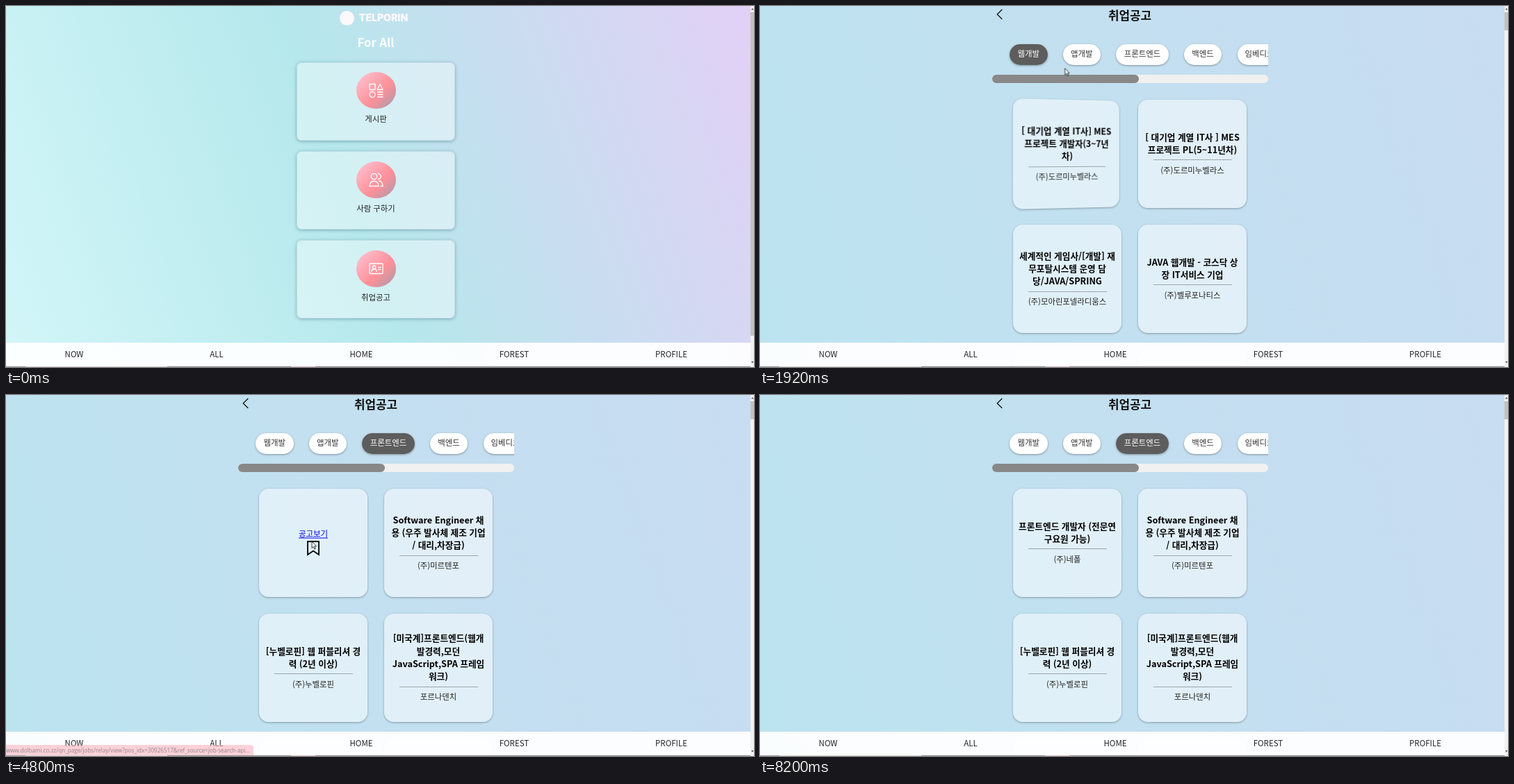
Recreate the animation shown at these times as an HTML page. Size 1076 by 520 pixels, loop 8.27 s.

```html
<!DOCTYPE html>
<html lang="ko">
<head>
<meta charset="utf-8">
<title>Job board</title>
<style>
html, body { margin: 0; width: 100%; height: 100%; overflow: hidden; }
body {
  position: relative; color: #222;
  font: 11.4px/1.2 "Noto Sans CJK KR", "Noto Sans KR", "Noto Sans CJK", "Noto Sans CJK JP", sans-serif;
}
body div, body svg { position: absolute; box-sizing: border-box; }
svg { overflow: visible; }
.fill { inset: 0; }
.t { white-space: nowrap; transform: translate(-50%, -55%); }
#menu { background: linear-gradient(70deg, #d3f6f8, #b5e8ec 46%, #e3d0f6); }
#list { background: linear-gradient(70deg, #bce4f0, #c2e0f0 45%, #c8dcf2); }
.head { font-size: 16.6px; font-weight: 700; }

.panel {
  left: 418px; width: 228px; height: 113px; border-radius: 7px; overflow: hidden;
  background: rgba(255,255,255,.4); border: 1px solid rgba(150,190,205,.35);
}
.shade { left: 418px; width: 228px; height: 113px; border-radius: 7px; box-shadow: 0 1px 5px rgba(20,70,90,.38); }
.badge {
  left: 85px; top: 13.5px; width: 57px; height: 53px; border-radius: 50%;
  background: linear-gradient(135deg, #ffbccb 12%, #ff9099 58%, #b39aa8 92%);
}
.badge svg { left: 18px; top: calc(50% - 10.5px); fill: none; stroke: #fff; stroke-width: 1.3; stroke-linejoin: round; stroke-linecap: round; }
.label { left: 113px; top: 82.5px; font-weight: 500; }
.hint { left: 113px; top: 122px; font-size: 9.2px; }

#tabs { left: 334px; top: 45px; width: 396.5px; height: 50px; overflow: hidden; }
.tab {
  top: 9.5px; height: 30.5px; border-radius: 16px; color: #333; background: #fff;
  box-shadow: 0 1px 3px rgba(0,0,0,.35); overflow: hidden;
}
.tab .t { left: 50%; top: 50%; }
.on { background: #5d5d5d; color: #fff; opacity: 0; }

.card { width: 156px; height: 156px; }
.flip { inset: 0; transform-style: preserve-3d; transform: perspective(700px) rotateY(0deg); }
.face {
  inset: 0; border-radius: 14px; backface-visibility: hidden;
  background: rgba(255,255,255,.5); box-shadow: 0 1px 3px rgba(0,0,0,.33);
}
.back { transform: rotateY(180deg); }
.job {
  inset: 0; padding-bottom: 2.2px; color: #000; text-align: center; white-space: nowrap;
  display: flex; flex-direction: column; align-items: center; justify-content: center;
}
.job b { font-size: 12.65px; line-height: 18.2px; font-weight: 700; }
.job i { width: 113px; height: 1px; margin: 5.4px 0 5.7px; background: #9ca6ab; }
.job span { line-height: 16px; color: #222; }
.link { left: 78px; top: 66px; color: #00e; text-decoration: underline; }

#nav { left: 0; top: 484.5px; width: 1070.5px; height: 35.5px; background: rgba(255,255,255,.93); }
#nav .t { top: 18px; font-size: 11.5px; }
#edge {
  left: 0; top: 518.6px; width: 1070.5px; height: 1.4px;
  background: linear-gradient(90deg, #999 28px, #d9d3d3 28px 232px, #8b8b8b 232px 410px, #d8bfc2 410px 445px, #8b8b8b 445px);
}
.tip {
  left: 0; top: 503.5px; height: 15.5px; border-radius: 0 4px 0 0; overflow: hidden;
  background: #fdb3c1; color: #4a3439; white-space: nowrap;
  font: 8.1px/15px "Open Sans", "Noto Sans", sans-serif;
}
.bar { right: 0; top: 0; width: 5.5px; height: 520px; background: #f1f1f1; }
.bar div { left: .5px; width: 4.5px; background: #c1c1c1; }
.bar svg { left: 0; top: 0; fill: #555; }
#mouse { left: 0; top: 0; opacity: 0; }
#mouse path { fill: #fff; stroke: #111; stroke-width: .8; stroke-linejoin: round; }
</style>
</head>
<body>
<div id="menu" class="fill">
  <div style="left:480px;top:6.5px;width:21px;height:21px;border-radius:50%;background:#fdf8fc"></div>
  <div class="t" style="left:543px;top:17.5px;color:#fdf8fc;font:900 14px/1.2 Inter,sans-serif">TELPORIN</div>
  <div class="t head" style="left:532px;top:54px;color:#fff">For All</div>
</div>
<div id="list" class="fill">
  <svg width="10" height="16" style="left:340px;top:3.5px" fill="none" stroke="#111" stroke-width="1.3"><path d="M8.3 1 1.2 8l7.1 7"/></svg>
  <div class="t head" style="left:532px;top:14px;color:#111;font-size:16.9px">취업공고</div>
  <div id="tabs"></div>
  <div style="left:334px;top:99px;width:396.5px;height:12px;border-radius:6px;background:#f1f1f1"></div>
  <div style="left:334px;top:99px;width:210.5px;height:12px;border-radius:6px;background:#888"></div>
</div>
<div id="nav"></div>
<div id="edge"></div>
<div class="tip" id="tipA" style="width:125.5px;text-indent:-3px">https://k42d907.q.morun.zz/recruit</div>
<div class="tip" id="tipB" style="width:355.5px">www.dolbami.co.zz/qn_page/jobs/relay/view?pos_idx=30926517&amp;ref_source=job-search-api...</div>
<div id="mouse">
  <svg id="arrow" width="8" height="12"><path d="M0 0V9.5L2.2 7.4 3.8 11 5.2 10.4 3.7 6.9H6.7Z"/></svg>
  <svg id="hand" width="10" height="15"><path d="M-.9 1Q0-.5.9 1V5.2L5 6.2Q6.1 6.6 5.8 8.2L5 13.8H.2L-3 9.4Q-3.5 7.6-1.9 7.9L-.9 8.8Z"/></svg>
</div>

<script>
const LOOP = 8270;
const SWITCH = 1230;   // menu page gives way to the list page
const $ = id => document.getElementById(id);

function add(parent, cls, css = '', html = '') {
  const el = document.createElement('div');
  el.className = cls;
  el.style.cssText = css;
  el.innerHTML = html;
  parent.append(el);
  return el;
}

// Each key is [ms, properties, easing towards the next key].
function track(el, ...keys) {
  const frames = keys.map(([ms, props, easing = 'linear']) => ({ ...props, easing, offset: ms / LOOP }));
  frames.push({ ...keys[keys.length - 1][1], offset: 1 });
  el.animate(frames, { duration: LOOP, iterations: Infinity });
}

const off = { opacity: 0 }, on = { opacity: 1 };

// Hard on/off visibility during the given [from, until] spans.
function show(el, ...spans) {
  const keys = spans[0][0] > 0 ? [[0, off, 'step-end']] : [];
  for (const [from, to] of spans) {
    keys.push([from, on, 'step-end']);
    if (to < LOOP) keys.push([to, off, 'step-end']);
  }
  track(el, ...keys);
}

// Frame: scrollbars and bottom menu
function scrollbar(page, top, height) {
  add(page, 'bar', '', `<div style="top:${top}px;height:${height}px"></div>
    <svg width="6" height="520"><path d="M1 5.5 2.8 3 4.6 5.5ZM1 512 2.8 514.5 4.6 512Z"/></svg>`);
}
scrollbar($('menu'), 9, 466);
scrollbar($('list'), 9, 26);
Object.entries({ NOW: 98, ALL: 303, HOME: 511, FOREST: 731, PROFILE: 957 })
  .forEach(([name, x]) => add($('nav'), 't', `left:${x}px`, name));

// Menu page
const icons = [
  '<path d="M1 1.5H9V9.5H1ZM12 9.5 16 1.5 20 9.5ZM12.5 13H20M12.5 16.5H20M12.5 20H20"/><circle cx="5" cy="16.5" r="4"/>',
  '<circle cx="7.5" cy="5.5" r="4.2"/><path d="M1 19.5C1 9.8 14 9.8 14 19.5ZM13 1.6C18.5 1.4 18.5 9.2 13.4 9.4M14.5 12C18 12.6 20 15.5 20 19.5H17"/>',
  '<rect x="1" y="3" width="19" height="14.5" rx="1"/><circle cx="7.5" cy="8.2" r="2.2"/><path d="M4 14.5C4 9.8 11 9.8 11 14.5M13.5 8.5H17M13.5 11.5H17"/>'
];
['게시판', '사람 구하기', '취업공고'].forEach((name, i) => {
  const top = 80.8 + i * 128.3;
  const shade = add($('menu'), 'shade', `top:${top}px`);
  const panel = add($('menu'), 'panel', `top:${top}px`);
  const badge = add(panel, 'badge', '', `<svg width="21" height="21">${icons[i]}</svg>`);
  const label = add(panel, 't label', '', name);
  if (i < 2) return;
  const hint = add(panel, 't hint', '', '취업을 위해 공고를 자주 확인해봐요!');
  const grow = (el, from, to) => track(el, [0, from], [600, from, 'ease'], [840, to]);
  grow(shade, { height: '113px' }, { height: '142.5px' });
  grow(panel, { height: '113px' }, { height: '142.5px' });
  grow(badge, { top: '13.5px', height: '53px' }, { top: '19.5px', height: '57px' });
  grow(label, { top: '82.5px' }, { top: '92.5px' });
  grow(hint, off, on);
});

// Tabs
const tabs = [['웹개발', 25, 54.5], ['앱개발', 101.5, 54.5], ['프론트엔드', 178, 76], ['백엔드', 276, 54], ['임베디드', 352.5, 64]];
const active = tabs.map(([name, x, w]) => {
  const text = `<div class="t">${name}</div>`;
  const tab = add($('tabs'), 'tab', `left:${x}px;width:${w}px`, text);
  return add(tab, 'fill on', '', text);
});
track(active[0], [0, on], [2270, on], [2400, off]);
track(active[1], [0, off], [2270, off], [2400, on], [3570, on], [3700, off]);
track(active[2], [0, off], [3570, off], [3700, on]);

// Job cards: [title, company, shown from, shown until]
const WEB = SWITCH, APP = 2660, FRONT = 3960;
const jobs = [
  [['[ 대기업 계열 IT사] MES<br>프로젝트 개발자(3~7년<br>차)', '(주)도르미누벨라스', WEB, FRONT],
   ['프론트엔드 개발자 (전문연<br>구요원 가능)', '(주)네폴', FRONT, LOOP]],
  [['[ 대기업 계열 IT사 ] MES<br>프로젝트 PL(5~11년차)', '(주)도르미누벨라스', WEB, FRONT],
   ['Software Engineer 채<br>용 (우주 발사체 제조 기업<br>/ 대리,차장급)', '(주)미르텐포', FRONT, LOOP]],
  [['세계적인 게임사/[개발] 재<br>무포탈시스템 운영 담<br>당/JAVA/SPRING', '(주)모아린포넬라디움스', WEB, APP],
   ['[국내 스타트업] 웹 어플리<br>케이션 개발자', '(주)룬다미솔페르', APP, FRONT],
   ['[누벨로핀] 웹 퍼블리셔 경<br>력 (2년 이상)', '(주)누벨로핀', FRONT, LOOP]],
  [['JAVA 웹개발 - 코스닥 상<br>장 IT서비스 기업', '(주)벨루포나티스', WEB, APP],
   ['[누벨로핀] UI 개발자 모집<br>(신입 및 경력)', '(주)누벨로핀', APP, FRONT],
   ['[미국계]프론트엔드(웹개<br>발경력,모던<br>JavaScript,SPA 프레임<br>워크)', '포르나덴치', FRONT, LOOP]],
  [], []
];
const ribbon = 'M1 1H17V20L9 14.5 1 20Z';
const flips = jobs.map((texts, i) => {
  const card = add($('list'), 'card', `left:${364 + i % 2 * 180}px;top:${135 + (i >> 1) * 180}px`);
  const flip = add(card, 'flip');
  const front = add(flip, 'face');
  for (const [title, firm, from, to] of texts)
    show(add(front, 'job', '', `<b>${title}</b><i></i><span>${firm}</span>`), [from, to]);
  const back = add(flip, 'face back', '', `<div class="t link">공고보기</div>
    <svg width="18" height="21" style="left:69px;top:75px" fill="none" stroke="#000" stroke-width="1.8">
    <path d="${ribbon}"/><path class="mark" d="${ribbon}" fill="#000"/></svg>`);
  const mark = back.querySelector('.mark');
  if (i === 0) show(mark, [5770, LOOP]);
  else mark.remove();
  return flip;
});

const turn = deg => ({ transform: `perspective(700px) rotateY(${deg}deg)` });
const cutEase = 'cubic-bezier(.35,.09,.45,.67)';   // first half of "ease", left early
track(flips[0],
  [0, turn(0)], [1289, turn(0), cutEase], [1596, turn(146.6), 'ease'], [2090, turn(0)],
  [4190, turn(0), 'ease'], [4790, turn(180)], [6490, turn(180), 'ease'], [7090, turn(0)]);
track(flips[1], [0, turn(0)], [4090, turn(0), 'ease-in'], [4190, turn(45), 'ease'], [4340, turn(0)]);

// Pages and link hints
show($('menu'), [0, SWITCH]);
show($('list'), [SWITCH, LOOP]);
show($('tipA'), [740, SWITCH]);
track($('tipB'), [0, off], [4480, off], [4550, on], [4740, on], [4800, { opacity: .6 }], [4940, off]);

// Pointer
const at = (x, y) => ({ transform: `translate(${x}px,${y}px)` });
track($('mouse'),
  [0, at(788, 5)], [230, at(788, 5), 'ease-in-out'], [480, at(690, 310), 'ease-out'], [850, at(574, 415)],
  [SWITCH, at(574, 415), 'ease-out'], [1430, at(378, 151)], [1580, at(384, 138), 'ease-in-out'], [2130, at(462, 69)],
  [3200, at(462, 72), 'ease-in-out'], [3500, at(554, 74)],
  [4030, at(554, 82)], [4110, at(556, 140)], [4190, at(519, 165), 'ease-out'], [4520, at(446, 200)], [4800, at(440, 211)],
  [4870, at(440, 211), 'ease-in-out'], [5150, at(450, 200), 'ease-in-out'], [5570, at(440, 214)],
  [6440, at(440, 214), 'ease-out'], [6730, at(858, 389), 'ease-out'], [7020, at(970, 494)]);
show($('mouse'), [250, 2400], [3200, 7080]);
show($('hand'), [620, SWITCH], [2100, 2400], [3420, 4060]);
show($('arrow'), [0, 620], [SWITCH, 2100], [3200, 3420], [4060, LOOP]);
</script>
</body>
</html>
```
